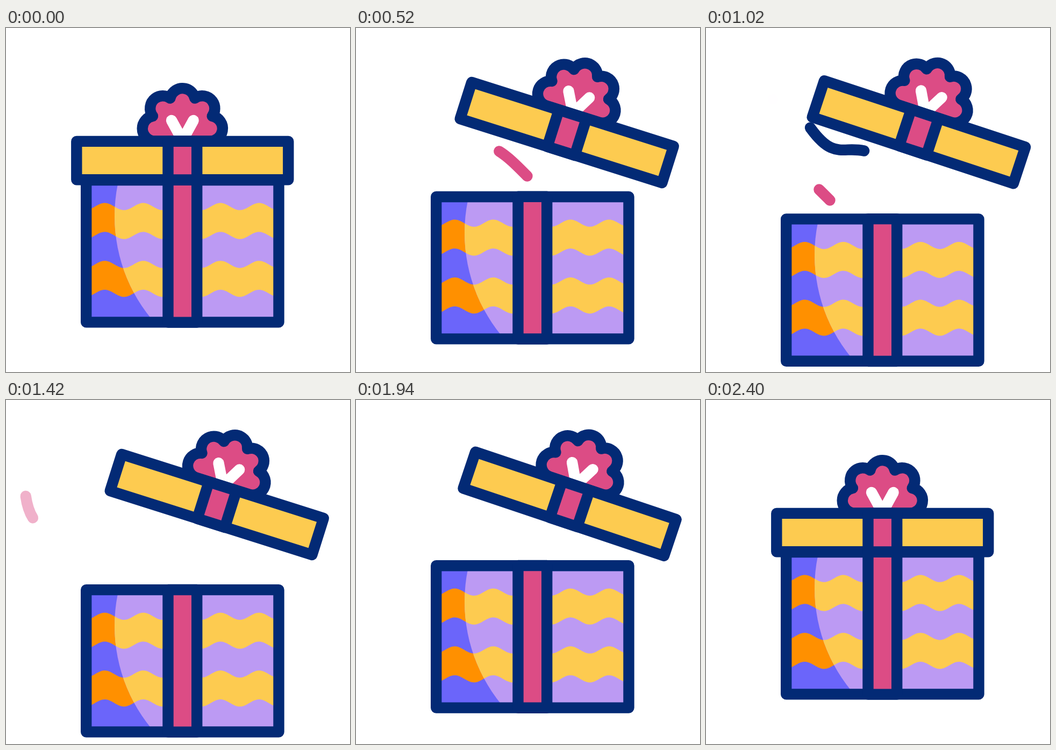
These frames come from a looping animation (640 by 640 pixels, 2.42 s). An HTML page with a canvas:

```html
<!DOCTYPE html>
<html lang="en">
<head>
<meta charset="utf-8">
<title>Gift box</title>
<style>
  html, body { margin: 0; width: 100%; height: 100%; overflow: hidden; background: #fff; }
  canvas { display: block; width: 640px; height: 640px; }
</style>
</head>
<body>
<canvas id="stage" width="640" height="640"></canvas>
<script>
const ctx = document.getElementById('stage').getContext('2d');
const LOOP = 2420;
const LINE = 20.4;
const NAVY = '#032a75', PINK = '#dc4c85', YELLOW = '#fdcb50', LILAC = '#bc9af3',
      VIOLET = '#6b65fa', ORANGE = '#ff9000';

const clamp = u => Math.min(1, Math.max(0, u));
const lerp = (a, b, k) => a + (b - a) * k;

// Smoothstep progress of t between two moments
function ease(t, from, to) {
  const u = clamp((t - from) / (to - from));
  return u * u * (3 - 2 * u);
}

function rect(x, y, right, bottom, fill) {
  ctx.beginPath();
  ctx.rect(x, y, right - x, bottom - y);
  if (fill) {
    ctx.fillStyle = fill;
    ctx.fill();
  }
  ctx.strokeStyle = NAVY;
  ctx.stroke();
}

// ---- box ----
const waveY = x => -6.65 * Math.cos((x - 183.6) * 2 * Math.PI / 71.8);

function stripe(y) {
  ctx.beginPath();
  for (let x = 150; x <= 508; x += 2) ctx.lineTo(x, y + waveY(x));
  for (let x = 508; x >= 150; x -= 2) ctx.lineTo(x, y + 53.8 + waveY(x));
  ctx.fill();
}

function wrapping(base, band) {
  ctx.fillStyle = base;
  ctx.fillRect(149, 283, 358, 264);
  ctx.fillStyle = band;
  stripe(332.2);
  stripe(439.8);
}

function drawBox(drop) {
  ctx.save();
  ctx.translate(0, drop);
  wrapping(VIOLET, ORANGE);
  ctx.save();
  ctx.beginPath();
  ctx.arc(503, 350, 301, 0, 2 * Math.PI);
  ctx.clip();
  wrapping(LILAC, YELLOW);
  ctx.restore();
  rect(149.2, 283, 507.5, 547.4);
  rect(301.5, 282.8, 355.2, 547.6, PINK);
  ctx.restore();
}

// ---- lid with bow ----
const MID = { x: 328.3, y: 246.5 };
const LOBE = 23.5;
const LOBES = [[277.2, 187], [291.7, 149.7], [328.3, 135.7], [364.9, 149.7], [379.4, 187]];

// Angle on lobe a where its outline meets lobe b
function meeting(a, b, side) {
  const dx = b[0] - a[0], dy = b[1] - a[1];
  return Math.atan2(dy, dx) + side * Math.acos(Math.hypot(dx, dy) / 2 / LOBE);
}

function drawBow() {
  ctx.beginPath();
  LOBES.forEach((lobe, i) => {
    const prev = LOBES[i - 1], next = LOBES[i + 1];
    const start = prev ? meeting(lobe, prev, 1) : Math.PI / 2;
    const end = next ? meeting(lobe, next, -1) : Math.PI / 2;
    ctx.arc(lobe[0], lobe[1], LOBE, start, end);
  });
  ctx.closePath();
  ctx.fillStyle = PINK;
  ctx.fill();

  ctx.save();
  ctx.strokeStyle = '#fff';
  ctx.beginPath();
  ctx.moveTo(308, 172);
  ctx.lineTo(MID.x, 209);
  ctx.lineTo(348.6, 172);
  ctx.stroke();
  ctx.restore();

  ctx.beginPath();
  LOBES.forEach((lobe, i) => {
    const prev = LOBES[i - 1], next = LOBES[i + 1];
    const start = prev ? meeting(lobe, prev, 1) : Math.PI / 2;
    const end = next ? meeting(lobe, next, -1) : Math.PI / 2;
    ctx.arc(lobe[0], lobe[1], LOBE, start, end);
  });
  ctx.closePath();
  ctx.strokeStyle = NAVY;
  ctx.stroke();
}

function lidPose(t) {
  if (t < 300 || t > 2100) {
    const opening = t < 300;
    const turn = opening ? ease(t, 0, 300) : 1 - ease(t, 2100, 2400);
    let move = turn;
    if (!opening) {
      // The lid slides slightly past its seat, then settles back
      const past = 0.016;
      move = 1 - (1 + 2 * past) * (1 - turn);
      if (move < -past) move = -2 * past - move;
    }
    return { x: lerp(MID.x, 405.2, move), y: lerp(MID.y, 191.5, move), angle: 20 * turn };
  }
  const phase = (t - 300) % 900;
  const dip = ease(phase, 0, 450) - ease(phase, 450, 900);
  return { x: lerp(405.2, 378.7, dip), y: lerp(191.5, 197.6, dip), angle: 20 - 5 * dip };
}

function drawLid(t) {
  const pose = lidPose(t);
  ctx.save();
  ctx.translate(pose.x, pose.y);
  ctx.rotate(pose.angle * Math.PI / 180);
  ctx.translate(-MID.x, -MID.y);
  drawBow();
  rect(131.3, 210.9, 525.3, 282.3, YELLOW);
  rect(301.5, 210.9, 355.2, 282.5, PINK);
  ctx.restore();
}

// ---- streamers ----
const CURVE = 'M374 286C350 262 325 235 296 229C255 219 238 246 195 187C187 176 182 158 180 143';
const curve = new Path2D(CURVE);
const measure = document.createElementNS('http://www.w3.org/2000/svg', 'path');
measure.setAttribute('d', CURVE);
const LENGTH = measure.getTotalLength();

const STREAMERS = [
  { x: -55.5, y: -10.5, color: PINK, start: 295, span: 667 },
  { x: 0, y: 0, color: NAVY, start: 628, span: 534 },
  { x: -143.5, y: 34.5, color: PINK, start: 912, span: 534 }
];

function drawStreamer(s, t) {
  const age = t - s.start;
  if (age < 0 || age > s.span + 66) return;
  const tip = LENGTH * ease(age, 0, s.span);
  const tail = LENGTH * ease(age, 240, s.span + 70);
  ctx.save();
  ctx.translate(s.x, s.y);
  ctx.globalAlpha = 1 - ease(age, s.span - 134, s.span + 66);
  ctx.strokeStyle = s.color;
  ctx.setLineDash([Math.max(0.1, tip - tail), 2 * LENGTH]);
  ctx.lineDashOffset = -tail;
  ctx.stroke(curve);
  ctx.restore();
}

function draw(now) {
  const t = now % LOOP;
  ctx.fillStyle = '#fff';
  ctx.fillRect(0, 0, 640, 640);
  ctx.lineWidth = LINE;
  ctx.lineCap = ctx.lineJoin = 'round';
  STREAMERS.forEach(s => drawStreamer(s, t));
  drawBox(77 * (ease(t, 0, 1200) - ease(t, 1200, 2400)));
  drawLid(t);
  requestAnimationFrame(draw);
}
draw(0);
</script>
</body>
</html>
```
